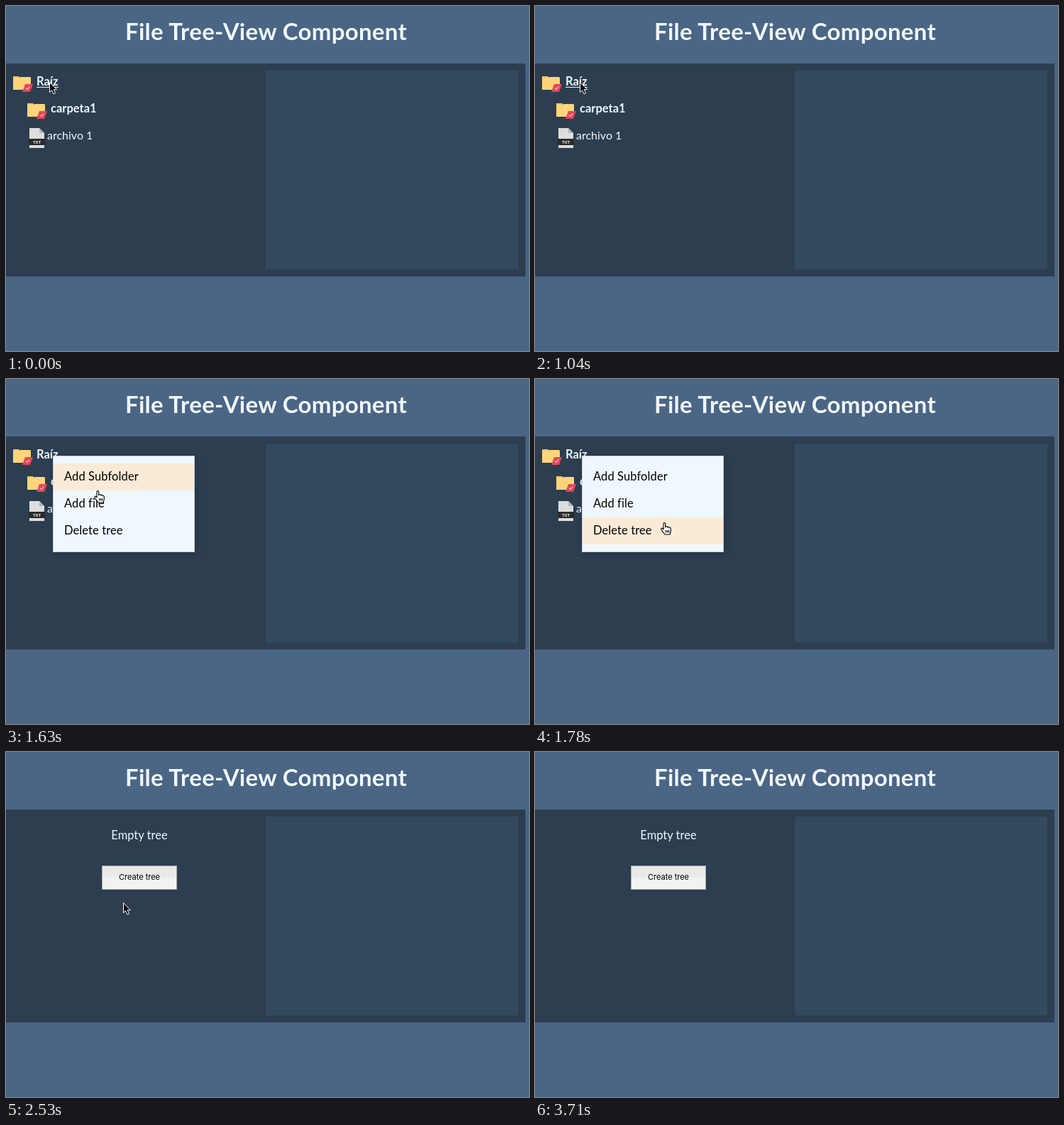
Recreate the animation shown at these times as an HTML page. Size 737 by 486 pixels, loop 4470 ms.

```html
<!DOCTYPE html>
<html lang="en">
<head>
<meta charset="utf-8">
<title>File Tree-View Component</title>
<style>
  html, body { margin: 0; width: 100%; height: 100%; overflow: hidden; background: #4b6584; }
  svg { display: block; font: 16.5px Lato, "Open Sans", sans-serif; fill: aliceblue; }
  .bold { font-weight: 700; }
  .menu-text { fill: #000; letter-spacing: .1px; }
  #box { filter: drop-shadow(2px 2px 5px rgba(0, 0, 0, .16)); }
</style>
</head>
<body>
<svg width="737" height="486" viewBox="0 0 737 486">
  <defs>
    <linearGradient id="shine" x2="0" y2="1">
      <stop stop-color="#e6e6e6"/>
      <stop offset=".5" stop-color="#ebebeb"/>
      <stop offset=".5" stop-color="#f1f1f1"/>
      <stop offset="1" stop-color="#f3f3f3"/>
    </linearGradient>
    <g id="folder">
      <path fill="#f0c264" d="M0 0H8L10 2H24V18H0Z"/>
      <path fill="#ffd47b" d="M0 2H9L11 1H24L25 2V19H0Z"/>
      <path fill="#e0485a" d="M17 11H28L24 22H13Z"/>
      <path fill="none" stroke="#fff" d="M18 16.5L19.8 18.5L23.2 14.5"/>
    </g>
  </defs>

  <rect width="737" height="486" fill="#4b6584"/>
  <text x="366.5" y="47.5" text-anchor="middle" class="bold" font-size="33" letter-spacing=".3">File Tree-View Component</text>
  <rect y="81" width="732" height="300" fill="#2c3e50"/>
  <rect x="366" y="91" width="356" height="280" fill="#33495d"/>

  <g id="tree">
    <use href="#folder" x="10" y="99"/>
    <text x="43" y="112" class="bold">Raíz</text>
    <rect id="underline" x="43" y="114" width="31" height="1"/>
    <use href="#folder" x="30" y="137"/>
    <text x="63" y="150" class="bold">carpeta1</text>
    <path fill="#dedede" d="M33 172H47L54 179V200H33Z"/>
    <path fill="#b5b5b5" d="M47 172L54 179H47Z"/>
    <rect x="32" y="187" width="23" height="9" fill="#2b2b2b"/>
    <text x="43.5" y="194" text-anchor="middle" class="bold" font-size="6" fill="#fff">TXT</text>
    <text x="58" y="188" font-size="16">archivo 1</text>
  </g>

  <g id="menu">
    <rect id="box" x="66.5" y="108.5" width="199" height="135" stroke="#c4ccd3"/>
    <rect id="hover" x="67" width="198" height="38" fill="antiquewhite"/>
    <g class="menu-text">
      <text x="82" y="143">Add Subfolder</text>
      <text x="82" y="181">Add file</text>
      <text x="82" y="219">Delete tree</text>
    </g>
  </g>

  <g id="empty">
    <text x="188" y="123" text-anchor="middle">Empty tree</text>
    <rect x="135.5" y="160.5" width="105" height="33" fill="url(#shine)" stroke="#a9a9a9"/>
    <text x="188" y="180" text-anchor="middle" font-family="Inter, sans-serif" font-size="11" fill="#000">Create tree</text>
  </g>

  <path id="arrow" fill="#000" stroke="#fff" d="M.5 .5V14.5L3.6 11.6L6 17L8.5 15.9L6.1 10.7H10.5Z"/>
  <path id="hand" fill="#fff" stroke="#000" stroke-width="1.1" stroke-linejoin="round"
    d="M4 10V2.2Q4 .6 5.3 .6T6.7 2.2V7Q7 5.3 8.2 5.5T9.4 7Q9.8 5.9 10.9 6.2T12 7.8Q12.3 7 13.3 7.3T14.3 9V12.5L13 17H6L2.8 12.8L.8 9.8Q.4 8.6 1.5 8.2T4 10ZM7.5 11V14.5M9.6 11V14.5M11.6 11V14.5"/>
</svg>
<script>
const LOOP = 4470, TICK = 148;
// Moments counted in ticks
const OPEN = 8, HOVER = 11, ON_EDGE = 16, DELETED = 17, GONE = 25;

// Pointer stops; it moves in a straight line from one to the next
const path = [
  { at: 0, x: 61, y: 107 },
  { at: 9, x: 64, y: 107 },
  { at: 10, x: 71, y: 111 },
  { at: 12, x: 177, y: 202 },
  { at: 13, x: 159, y: 215 },
  { at: 15, x: 159, y: 214 },
  { at: 16, x: 163, y: 212 },
  { at: 22, x: 173, y: 212 },
  { at: 23, x: 211, y: 239 },
  { at: 24, x: 641, y: 409 }
];

const el = id => document.getElementById(id);
const show = (id, on) => el(id).setAttribute("display", on ? "inline" : "none");

function pointer(tick) {
  const from = path.findLast(stop => stop.at <= tick);
  const to = path.find(stop => stop.at > tick) || from;
  const k = (tick - from.at) / (to.at - from.at || 1);
  const mix = axis => Math.round(from[axis] + (to[axis] - from[axis]) * k);
  return [mix("x"), mix("y")];
}

function draw() {
  const tick = Math.floor(performance.now() % LOOP / TICK);
  const [x, y] = pointer(tick);
  const hand = tick >= HOVER && tick < ON_EDGE;

  show("tree", tick < DELETED);
  show("underline", tick < OPEN);
  show("menu", tick >= OPEN && tick < DELETED);
  show("empty", tick >= DELETED);

  show("hover", tick >= HOVER && tick < DELETED);
  el("hover").setAttribute("y", y < 195 ? 119 : 195);

  show("hand", hand);
  show("arrow", !hand && tick < GONE);
  el(hand ? "hand" : "arrow").setAttribute("transform", `translate(${x} ${y})`);
  requestAnimationFrame(draw);
}
draw();
</script>
</body>
</html>
```
